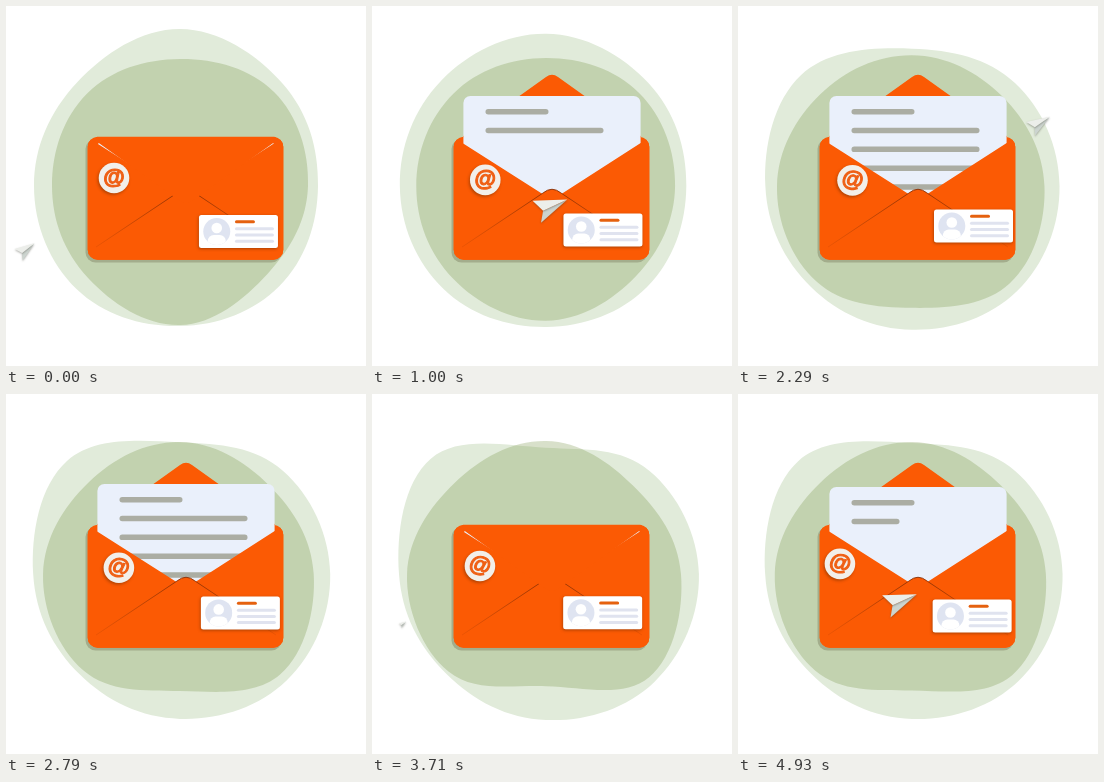
An HTML page with a canvas for the animation above (5 s loop, 360 by 360 pixels).

```html
<!DOCTYPE html>
<html lang="en">
<head>
<meta charset="utf-8">
<title>Mail</title>
<style>
html, body { margin: 0; width: 100%; height: 100%; overflow: hidden; background: #fff; }
canvas { display: block; }
</style>
</head>
<body>
<canvas id="stage" width="360" height="360"></canvas>
<script>
const c = document.getElementById('stage').getContext('2d');
const { PI, sin, cos, min, max } = Math;
const LOOP = 5000, CYCLE = 4000;
const ORANGE = '#fb5a04';

// Two poses per blob: radii clockwise from the right, 45 degrees apart
const OUTER = [
  [138, 141, 140, 146, 146, 146, 157, 145],
  [153, 153, 146, 141, 147, 163, 126, 146]];
const INNER = [
  [128, 124, 139, 130, 128, 131, 127, 133],
  [135, 146, 112, 138, 139, 129, 133, 124]];

const wave = (t, period) => sin(2 * PI * t / period);

function ease(t, from, to) {
  const p = min(1, max(0, (t - from) / (to - from)));
  return p * p * (3 - 2 * p);
}

function shadow(color, blur, x, y) {
  c.shadowColor = color;
  c.shadowBlur = blur;
  c.shadowOffsetX = x;
  c.shadowOffsetY = y;
}

function polygon(color, ...points) {
  c.fillStyle = color;
  c.beginPath();
  points.forEach(([x, y]) => c.lineTo(x, y));
  c.closePath();
  c.fill();
}

function box(color, x, y, w, h, r) {
  c.fillStyle = color;
  c.beginPath();
  c.roundRect(x, y, w, h, r);
  c.fill();
}

function disc(color, x, y, r) {
  c.fillStyle = color;
  c.beginPath();
  c.arc(x, y, r, 0, 7);
  c.fill();
}

function blob(color, [start, end], mix) {
  const points = start.map((r, i) => {
    const radius = r + (end[i] - r) * mix, angle = i * PI / 4;
    return [174 + radius * cos(angle), 180 + radius * sin(angle)];
  });
  const at = i => points[(i + 8) % 8];
  // Control point beside a point, parallel to the line through its neighbours
  const handle = (i, side) => at(i).map((v, k) => v + side * 0.1875 * (at(i + 1)[k] - at(i - 1)[k]));
  c.fillStyle = color;
  c.beginPath();
  c.moveTo(...at(0));
  for (let i = 0; i < 8; i++) c.bezierCurveTo(...handle(i, 1), ...handle(i + 1, -1), ...at(i + 1));
  c.fill();
}

// fold runs from 1 (closed, pointing down) to -1 (open, pointing up)
function flap(fold) {
  const y = v => 131 + v * fold + max(0, 4 * fold);
  c.fillStyle = ORANGE;
  c.beginPath();
  c.moveTo(90, 131);
  c.lineTo(90, y(0));
  c.lineTo(174, y(60));
  c.quadraticCurveTo(180, y(64.5), 186, y(60));
  c.lineTo(270, y(0));
  c.lineTo(270, 131);
  c.fill();
}

function letter(t) {
  const top = 134 - 44 * (ease(t, 560, 1000) - ease(t, 2860, 3270));
  box('#eaf0fb', 91.4, top, 177.2, 240 - top, [7, 7, 0, 0]);
  let typed = t - 820;
  for (let i = 0; i < 5 && typed > 0; i++) {
    const full = i ? 128 : 63;
    box('#abada3', 113.5, top + 13 + i * 18.8, min(typed, full), 5.5, 2.7);
    typed -= full;
  }
}

function pocket() {
  c.fillStyle = ORANGE;
  c.beginPath();
  c.moveTo(81, 131);
  c.lineTo(180, 194);
  c.lineTo(278, 131);
  c.lineTo(278, 255);
  c.lineTo(81, 255);
  c.fill();
  c.beginPath();
  c.moveTo(90, 241);
  c.lineTo(171, 187);
  c.quadraticCurveTo(180, 179.5, 189, 187);
  c.lineTo(270, 241);
  c.fill();
  const fade = c.createLinearGradient(90, 0, 270, 0);
  fade.addColorStop(0, 'rgba(150,55,5,0.15)');
  fade.addColorStop(0.5, 'rgba(130,45,5,0.9)');
  fade.addColorStop(1, 'rgba(150,55,5,0.15)');
  c.strokeStyle = fade;
  c.lineWidth = 1;
  c.stroke();
}

function envelope(t) {
  const fold = 1 - 2 * (ease(t, 120, 580) - ease(t, 3240, 3620));
  box('#a3ad8c', 79.5, 133, 196, 123.5, 10);
  c.save();
  // Inner parts stay within the body, or above it between its corners
  c.beginPath();
  c.roundRect(81.7, 130.7, 195.6, 123, 10);
  c.rect(91, 0, 178, 136);
  c.clip();
  box(ORANGE, 81, 130.7, 197, 124, 10);
  if (fold < 0) flap(fold);
  letter(t);
  pocket();
  if (fold >= 0) flap(fold);
  c.restore();
}

function badge(t, mix) {
  const swing = wave(t, 7400);
  c.save();
  c.translate(108 + 7 * swing, 172 + 2.5 * swing);
  shadow('rgba(90,40,0,0.45)', 3, -1, 1.5);
  disc('#f2efea', 0, 0, 15.3);
  shadow('transparent', 0, 0, 0);
  c.rotate(0.28 * mix);
  c.fillStyle = c.strokeStyle = '#ef5f14';
  c.lineWidth = 1.1;
  c.font = 'bold 22px "Liberation Sans", Arial, sans-serif';
  c.textAlign = 'center';
  c.fillText('@', 0, 5.8);
  c.strokeText('@', 0, 5.8);
  c.restore();
}

function card(t) {
  c.save();
  c.translate(193.5 + 2.5 * wave(t - 1490, 3200), 205.5 + 3.5 * wave(t + 1650, 6600));
  shadow('rgba(90,40,0,0.5)', 3, -0.5, 1);
  box('#fff', 0, 0, 79, 33, 2.5);
  shadow('transparent', 0, 0, 0);
  box('#e5610f', 36, 5.3, 20, 3, 1.5);
  [12.3, 18.5, 24.7].forEach(y => box('#e0e3ef', 36, y, 39, 3, 1.5));
  disc('#dfe4f1', 17.8, 16.5, 13.5);
  c.clip();
  disc('#fff', 17.8, 13, 5.3);
  box('#fff', 8.8, 20, 18, 12, 7);
  c.restore();
}

// Flies round a tilted ellipse, smaller on the far side
function plane(phase) {
  const nose = [19, -8], notch = [-4, 2.5];
  const size = min(1.05, 0.9 + cos(phase - 1.9));
  c.save();
  c.translate(168 - 150 * cos(phase), 183 + 61 * cos(phase) + 22 * sin(phase));
  c.rotate(-0.25 * cos(phase) ** 2);
  c.scale(size, size);
  shadow('rgba(60,60,50,0.4)', 2, 0, 1);
  polygon('#ccd4cf', nose, notch, [-6, 14]);
  polygon('#eceeea', nose, [-14, -7], notch);
  c.restore();
}

function draw(t) {
  const u = t % CYCLE;
  const mix = (1 - cos(2 * PI * t / 7800)) / 2;
  const phase = 2 * PI * (u + 30) / CYCLE;
  const behind = sin(phase) < 0;
  c.fillStyle = '#fff';
  c.fillRect(0, 0, 360, 360);
  blob('#e1ebda', OUTER, mix);
  blob('rgba(110,142,59,0.27)', INNER, mix);
  if (behind) plane(phase);
  envelope(u);
  badge(t, mix);
  card(t);
  if (!behind) plane(phase);
}

function tick() {
  draw(performance.now() % LOOP);
  requestAnimationFrame(tick);
}
tick();
</script>
</body>
</html>
```
